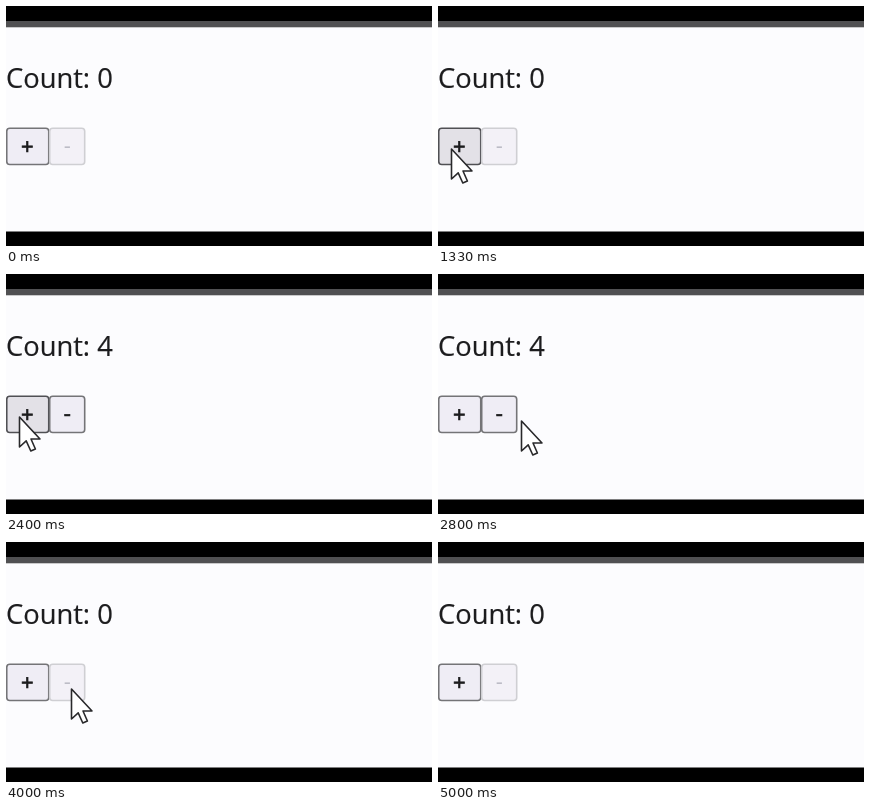
An HTML page that plays this animation: 426 px wide and 240 px high, repeating every 5.07 s.

```html
<!DOCTYPE html>
<html lang="en">
<head>
<meta charset="utf-8">
<title>Counter</title>
<style>
  html, body { margin: 0; width: 100%; height: 100%; overflow: hidden; background: #000; }
  svg { display: block; width: 100%; height: 100%; font-family: "Open Sans", "Noto Sans", sans-serif; }
  text { fill: #1c1c1e; stroke: #1c1c1e; stroke-width: .2; }
  .button rect { fill: #efedf5; stroke: #747477; stroke-width: 1.6; }
  .button text { font-size: 22px; text-anchor: middle; stroke-width: .7; }
  .button.hover rect { fill: #e3e1e7; stroke: #505054; }
  .button.disabled rect { fill: #f3f1f7; stroke: #cfcfd3; }
  .button.disabled text { fill: #bcbcc6; stroke: none; }
</style>
</head>
<body>
<svg viewBox="0 0 426 240">
  <defs><clipPath id="page"><rect y="21" width="426" height="204.5"/></clipPath></defs>
  <rect width="426" height="240"/>
  <rect y="15" width="426" height="7" fill="#505052"/>
  <rect y="21.3" width="426" height="204.2" fill="#fcfcfe"/>
  <text id="count" x="0" y="81.5" font-size="27.3">Count: 0</text>
  <g id="plus" class="button">
    <rect x=".75" y="122.2" width="42" height="36.3" rx="3"/>
    <text x="21.3" y="147.8">+</text>
  </g>
  <g id="minus" class="button">
    <rect x="43.7" y="122.2" width="35" height="36.3" rx="3"/>
    <text x="61.3" y="147.3">-</text>
  </g>
  <g clip-path="url(#page)">
    <path id="cursor" d="M.5 0V30L7.2 23.8L11.8 34L16.4 32L12 22H21Z"
      fill="#fff" stroke="#29292b" stroke-width="1.6" stroke-linejoin="round"/>
  </g>
</svg>
<script>
  const DURATION = 5070;
  const STEP = 1000 / 15;
  const [count, plus, minus, cursor] =
    ["count", "plus", "minus", "cursor"].map(id => document.getElementById(id));

  // Pointer path: time, x, y
  const path = [
    [800, 120, 226], [1200, 13, 143], [2400, 13, 143], [2730, 83, 147],
    [2820, 83, 147], [3000, 65, 147], [4270, 65, 147], [4670, 150, 226]
  ];
  const clicks = [
    [1500, 1], [1750, 1], [2030, 1], [2270, 1],
    [3130, -1], [3360, -1], [3600, -1], [3830, -1]
  ];

  function pointerAt(t) {
    const next = path.findIndex(point => point[0] > t);
    if (next < 1) return null;
    const [t0, x0, y0] = path[next - 1];
    const [t1, x1, y1] = path[next];
    const p = (t - t0) / (t1 - t0);
    const ease = p * p * (3 - 2 * p);
    return { x: x0 + (x1 - x0) * ease, y: y0 + (y1 - y0) * ease };
  }

  function render(time) {
    const t = Math.floor((time % DURATION + 4) / STEP) * STEP;
    const value = clicks.reduce((sum, [at, delta]) => sum + (t >= at ? delta : 0), 0);
    const pointer = pointerAt(t);
    const over = (left, right) => pointer !== null && pointer.x >= left &&
      pointer.x < right && pointer.y >= 122 && pointer.y < 158;

    count.textContent = `Count: ${value}`;
    plus.classList.toggle("hover", over(0, 43));
    minus.classList.toggle("hover", value > 0 && over(43, 79));
    minus.classList.toggle("disabled", value === 0);
    cursor.setAttribute("visibility", pointer ? "visible" : "hidden");
    if (pointer) cursor.setAttribute("transform", `translate(${pointer.x} ${pointer.y})`);
  }

  const start = performance.now();
  function tick() {
    render(performance.now() - start);
    requestAnimationFrame(tick);
  }
  tick();
</script>
</body>
</html>
```
